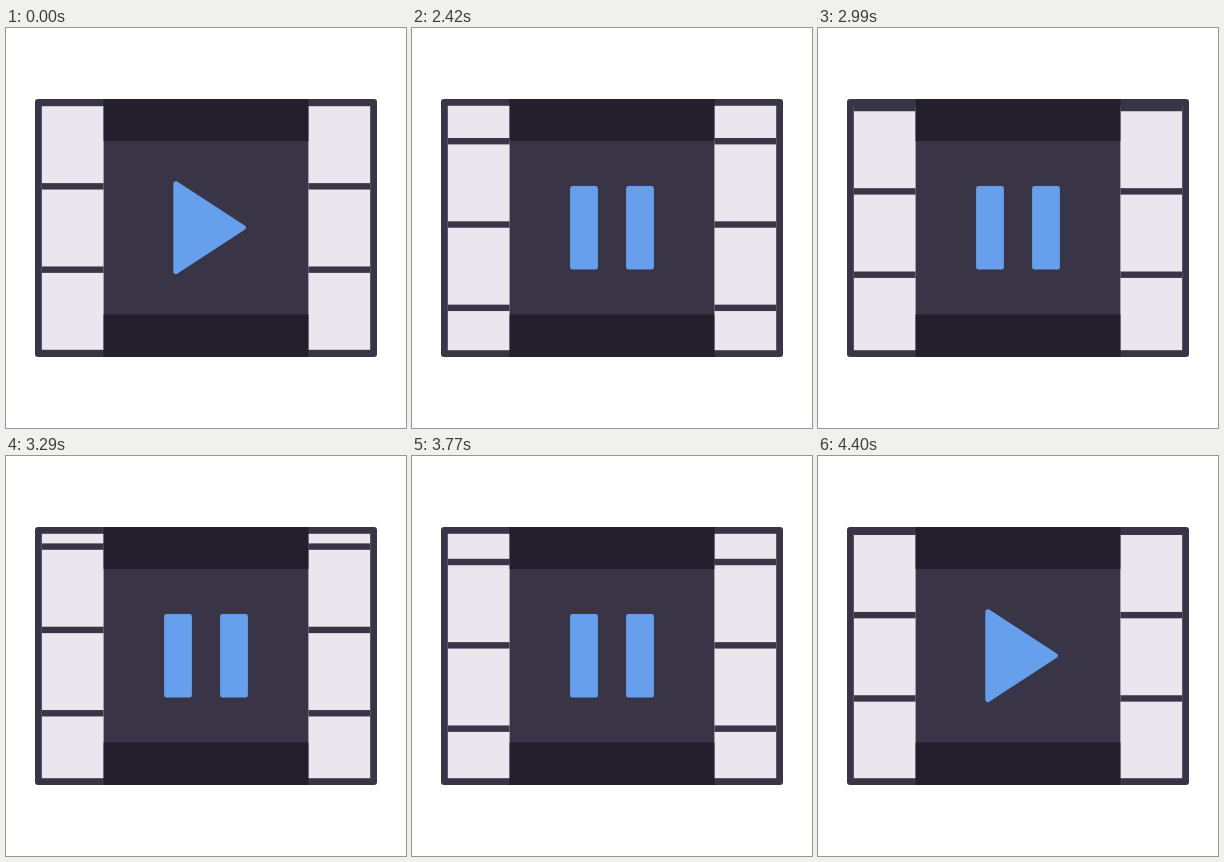
Recreate the animation shown at these times as an HTML page with a canvas. Size 400 by 400 pixels, loop 4430 ms.

```html
<!DOCTYPE html>
<html lang="en">
<head>
<meta charset="utf-8">
<title>Film play and pause</title>
<style>
  html, body { margin: 0; width: 100%; height: 100%; overflow: hidden; background: #fff; }
  canvas { display: block; }
</style>
</head>
<body>
<canvas id="stage" width="400" height="400"></canvas>
<script>
const ctx = document.getElementById('stage').getContext('2d');
const LOOP = 4430, PRESS_PLAY = 2000, PRESS_PAUSE = 4000, HALF = 120;
const TOP = 75, BOTTOM = 325, PITCH = (BOTTOM - TOP) / 3, TRAVEL = 12 * PITCH;
const FRAME = '#393446', BAND = '#241f2c', HOLE = '#ebe6ed', BLUE = '#66a0ed';

const clamp = x => Math.min(1, Math.max(0, x));
const smooth = x => x * x * (3 - 2 * x);
const mix = (a, b, p) => a + (b - a) * p;

// Bezier easing that is flat at both ends, with handle lengths x1 and 1 - x2
function ease(u, x1, x2) {
  let low = 0, high = 1;
  for (let i = 0; i < 24; i++) {
    const s = (low + high) / 2, r = 1 - s;
    if (3 * x1 * s * r * r + 3 * x2 * s * s * r + s * s * s < u) low = s;
    else high = s;
  }
  return smooth(low);
}

function rect(color, x, y, w, h) {
  ctx.fillStyle = color;
  ctx.fillRect(x, y, w, h);
}

// A triangle pointing right that morphs into an upright bar
function drawIcon(morph, shift) {
  const left = mix(169.8, 160.6, morph), right = mix(237.3, 183.4, morph);
  const tall = mix(44, 39.2, morph), tip = mix(0, 39.2, morph), y = 199.7;
  ctx.beginPath();
  ctx.moveTo(left + shift, y - tall);
  ctx.lineTo(right + shift, y - tip);
  ctx.lineTo(right + shift, y + tip);
  ctx.lineTo(left + shift, y + tall);
  ctx.closePath();
  ctx.fillStyle = ctx.strokeStyle = BLUE;
  ctx.lineWidth = 5;
  ctx.lineJoin = 'round';
  ctx.fill();
  ctx.stroke();
}

function draw(t) {
  // 0 = play triangle, 1 = single bar, 2 = pause bars
  const press = start => clamp((t - start) / (2 * HALF));
  const state = 2 * (press(PRESS_PLAY) - press(PRESS_PAUSE));
  const scale = 1 - 0.048 * (1 - Math.abs(state - 1));
  const scroll = TRAVEL * ease(clamp((t - PRESS_PLAY) / (LOOP - PRESS_PLAY)), 0.18, 0.76);

  ctx.setTransform(1, 0, 0, 1, 0, 0);
  rect('#fff', 0, 0, 400, 400);
  ctx.setTransform(scale, 0, 0, scale, 200 * (1 - scale), 200 * (1 - scale));

  ctx.fillStyle = FRAME;
  ctx.beginPath();
  ctx.roundRect(29, 71, 342, 258, 3);
  ctx.fill();

  for (const x of [35.8, 302.4]) {
    rect(HOLE, x, 77.8, 61.8, 244.4);
    for (let y = BOTTOM - scroll % PITCH; y > TOP; y -= PITCH)
      rect(FRAME, x, y - 3.2, 61.8, 6.4);
  }
  rect(BAND, 97.6, 71, 204.8, 42);
  rect(BAND, 97.6, 286.5, 204.8, 42.5);

  drawIcon(clamp(state), 0);
  if (state > 1) drawIcon(1, 56 * smooth(state - 1));
}

function tick() {
  draw(performance.now() % LOOP);
  requestAnimationFrame(tick);
}
tick();
</script>
</body>
</html>
```
